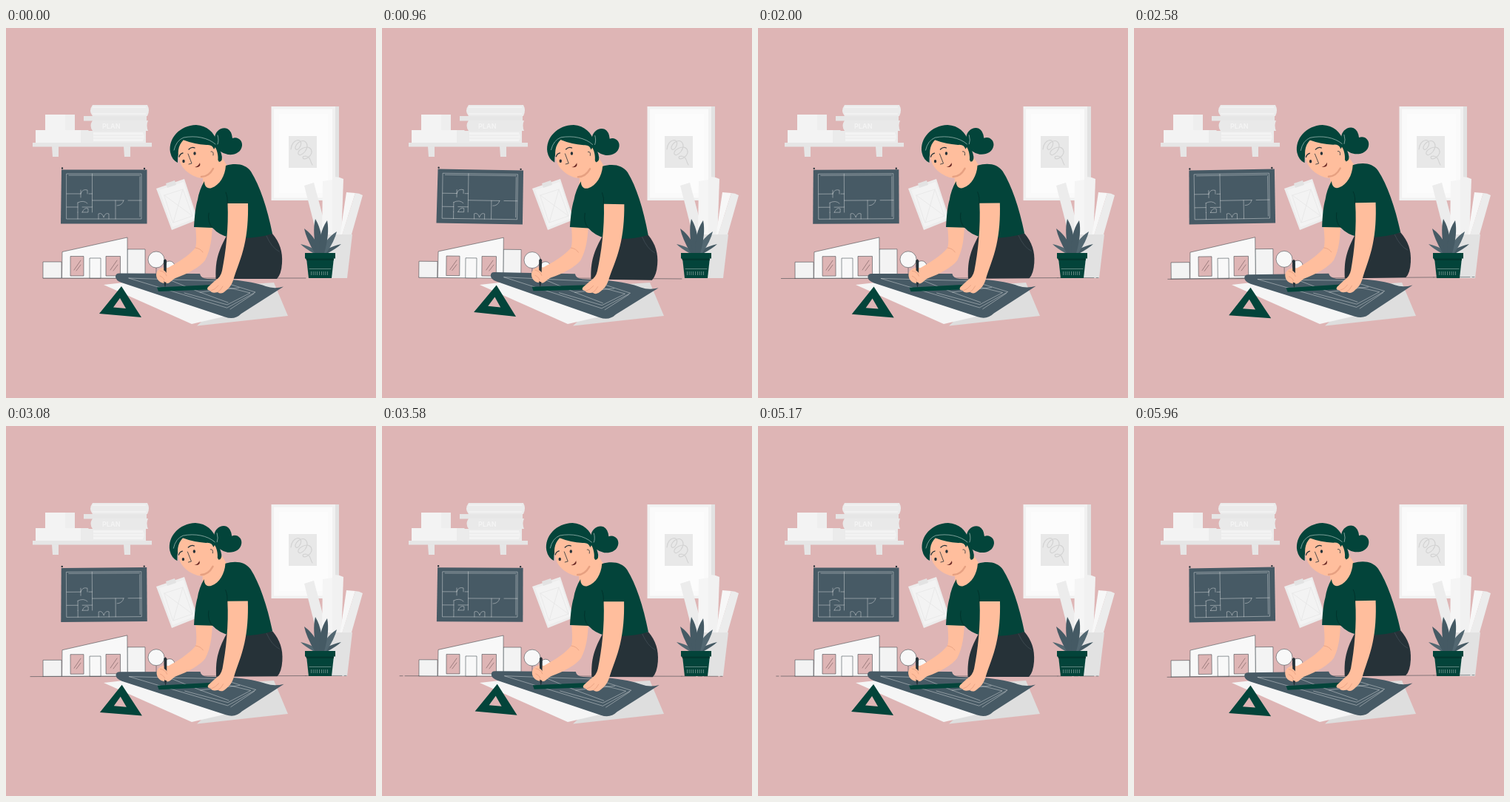
An HTML page that plays this animation: 500x500 px, repeating every 6000 ms.

```html
<!DOCTYPE html>
<html lang="en">
<head>
<meta charset="utf-8">
<title>Architect at work</title>
<style>
html, body { margin: 0; width: 100%; height: 100%; overflow: hidden; background: #deb5b5; }
svg { display: block; width: 100vw; height: 100vh; }
.line { fill: none; stroke-linecap: round; stroke-linejoin: round; }
.ink { stroke: #263238; stroke-width: .5; }
.chalk { stroke: #f2f2f2; stroke-width: .55; opacity: .75; }
.green { fill: #03443a; }
.slate { fill: #475a65; }
.dark { fill: #263238; }
.skin { fill: #ffbe9d; }
</style>
</head>
<body>
<svg viewBox="0 0 500 500">
  <rect width="500" height="500" fill="#deb5b5"/>

  <g id="shelf">
    <path fill="#e6e6e6" d="M62 160h9v14h-8zM159 160h9v14h-8z"/>
    <path fill="#e6e6e6" d="M36 155h161v5.500H36zM105 119h85v6.500h-85z"/>
    <path fill="#f3f3f3" d="M53 117h27v21H53z"/>
    <path fill="#eeeeee" d="M80 117h13v21H80z"/>
    <path fill="#f3f3f3" d="M40 138h61v17H40z"/>
    <path fill="#ebebeb" d="M101 138h10l2 2v15h-12z"/>
    <path fill="#ebebeb" d="M117 104h74q4 7 0 15h-74q-6-7 0-15z"/>
    <path fill="#f1f1f1" d="M117 106h72v2h-72zM117 115h72v2h-72z"/>
    <path fill="#e9e9e9" d="M117 125h75q-3 7 0 14h-75q-5-7 0-14z"/>
    <path fill="#ebebeb" d="M105 139h84v16h-84q-6-8 0-16z"/>
    <path fill="#f3f3f3" d="M118 141h67q3 6 0 12h-67z"/>
    <path class="line" stroke="#e2e2e2" stroke-width=".7" d="M118 145h67M118 149h67"/>
    <text x="130" y="136" font-family="Inter, sans-serif" font-size="9" font-weight="700" fill="#f4f4f4">PLAN</text>
  </g>

  <g id="picture">
    <path fill="#e2e2e2" d="M444 106h6v127h-6z"/>
    <path fill="#f1f1f1" d="M358.500 106H445v127h-86.500z"/>
    <path fill="#fafafa" d="M362 109.500h79v120h-79z"/>
    <path fill="#fff" d="M369 116h66v107h-66z" opacity=".4"/>
    <path fill="#e8e8e8" d="M382 146h38v43h-38z"/>
    <path class="line" stroke="#d3d3d3" stroke-width="1.200" d="M385 164C386 149 402 148 398 159C394 169 386 163 395 155C404 148 411 157 404 167C396 177 390 168 400 163C412 156 418 169 408 175C401 180 398 173 405 173C412 174 411 181 414 185"/>
  </g>

  <g id="rolls">
    <path fill="#ececec" d="M403 213l13-4 16 60-9 22z"/>
    <path fill="#f5f5f5" d="M428 207l13-2v82l-14-5z"/>
    <path fill="#f1f1f1" d="M441 202q7-2 15 2l-3 84h-12z"/>
    <path fill="#f7f7f7" d="M460 222l12 1-19 61-2-2z"/>
    <path fill="#ececec" d="M472 223q5 0 10 3l-17 60h-13z"/>
    <path fill="#e2e2e2" d="M432 279h36l-7 59h-31z"/>
  </g>

  <g id="clipboard">
    <path fill="#ededed" d="M203 217l38-13 18 55-35 14z"/>
    <path fill="#f3f3f3" d="M207 219l33-11 16 49-31 12z"/>
    <path fill="#e3e3e3" d="M216 210l12-4 2 6-12 4z"/>
    <path class="line" stroke="#e6e6e6" stroke-width=".8" d="M214 226l25-8 13 36-26 9zM214 226l38 28M239 218l-13 45"/>
  </g>

  <g id="floor">
    <path class="line ink" d="M50 338H405"/>
    <path id="tails" class="line ink" stroke-dasharray="19 3 6 2"/>
  </g>

  <g id="house">
    <g class="ink" fill="#f8f8f8">
      <path d="M50 316h25v22H50zM164 299h24v39h-24z" fill="#f3f3f3"/>
      <path d="M75.500 338L76 302.500 164 283v55z"/>
      <path d="M113 311h15v27h-15z"/>
      <path d="M87 308.500h18V335H87zM135 308.500h19.500V335H135z" fill="#deb5b5"/>
      <path d="M203 324v14M221 328v10"/>
      <circle cx="203" cy="313" r="11"/>
      <circle cx="221" cy="322" r="7"/>
    </g>
    <path class="line" stroke="#8d6f70" stroke-width=".8" d="M92 327l9-13M95 328l6-8M141 327l9-13M145 328l6-8"/>
  </g>

  <g id="plant">
    <g id="leaves"></g>
    <path class="green" d="M406 311h37l-3 27h-31z"/>
    <path fill="#02372f" d="M405 311h38v3h-37z"/>
    <path class="green" d="M404 304h41v7.500h-41z"/>
    <path class="line" stroke="#9fb2ad" stroke-width=".6" d="M410 325.500h29"/>
    <path fill="none" stroke="#9fb2ad" stroke-width="5" stroke-dasharray=".6 2.200" d="M412 331.500h25"/>
  </g>

  <g id="board">
    <path class="slate" d="M75 191.500h115.500V264.500H74z"/>
    <circle class="dark" cx="76" cy="189.500" r="1.200"/>
    <circle class="dark" cx="187" cy="190" r="1.200"/>
    <path class="line chalk" d="M82 197H183V258H82zM85 199H181M181 201V255M116.500 197V233H159M165 233H183M82 224H101M101 219V229M112 224H116.500M82 242H97M103 242H116.500V233M97 236V249M97 249V258M116.500 242V249M148 233V258M101 224Q103 217 110 219V224M97 236Q105 232 110 237M103 249Q106 242 111 244V249H103M125 258V251Q130 249 132 256Q134 249 139 251V258M159 233Q157 240 150 240"/>
  </g>

  <path fill="#dedede" d="M258 402.500L381 389 362 344 318 347z"/>
  <path fill="#f5f5f5" d="M132 347l36-4L303 388 251 400z"/>

  <g id="desk">
    <path class="dark" d="M298 281L360 278C370 290 374 302 373 318Q372 333 366 339H283.500C283 320 284 306 298 281z"/>
    <path class="line" stroke="#45525a" stroke-width=".7" d="M352 281Q359 297 369 302"/>

    <path class="slate" d="M148 336Q148 331.500 153 331.500L262 332Q263 338 272 339L304 340C325 342 341 345 351 349Q362 353 375 349.500L318 386Q309 395 296 390.500L156 344Q148 341 148 336z"/>
    <path class="line chalk" d="M166 338L289 342 337 357 299 378zM220 340L262 357 315 351M241 358L299 374 330 358 285 347M262 357L300 371M303 380L335 359"/>

    <path class="green" fill-rule="evenodd" d="M156 349L183 391 126 386zM154 365L145 377.500 162 379z"/>

    <path class="skin" d="M256 267C257 279 258 290 256 297C246 309 230 318 219 324C211 322 204 326 203 333C203 341 209 346 219 345C222 344 225 340 229 338C246 332 262 323 269 314C277 299 278 283 279 268z"/>
    <path class="green" d="M204 350.500L278 347 273 353.500 206 356z"/>
    <path class="dark" d="M213 314l2-2 2 2-.5 31-1.500 6-1.500-6z"/>
    <path class="skin" d="M206 327Q214 325 218 333L221 341Q216 346 213 342L207 336z"/>
    <path class="line" stroke="#e39a7c" stroke-width=".7" d="M208 328Q215 329 217 335M208 335Q213 337 214 341M256 297Q263 298 266 303"/>

    <path class="skin" d="M266 192L290 172 300 188 292 222 272 226 266 215z"/>
    <path class="green" d="M268 207C268 214 272 218 278 216C289 212 296 200 297 186C311 182 324 184 331 194C343 213 353 243 360 278Q335 286 302 283Q288 280 279 270L254 269C255 253 256 242 259 232Q261 219 268 207z"/>
    <path class="line" stroke="#022f28" stroke-width=".8" d="M274 250Q272 263 279 270M297 222Q300 229 299 238"/>

    <path class="skin" d="M299.500 237H327C327.500 258 326 277 322 294C318 312 311 327 307 341Q304 350 297 355Q291 361 286 357Q278 359 276 355Q270 354 273 350L283 341Q290 337 292 328C297 303 301 270 299.500 237z"/>
    <path class="line" stroke="#e39a7c" stroke-width=".7" d="M287 348Q282 354 277 355M293 349Q290 355 286 357"/>

    <path class="green" d="M282 149C282 140 291 133 299 136Q305 139 306 149C313 146 320 152 319 159C318 168 309 172 300 171Q288 169 283 158z"/>
    <path class="green" d="M222 168C219 149 235 131.500 257 131C272 132 281 141 285 153L291 170Q294 180 288 181L275 161 240 155Q231 168 232 182Q224 178 222 168z"/>
    <path class="skin" d="M240 151C232 159 231 170 235 181C239 191 246 196 254 200Q268 207 276 197L286 181C288 174 285 160 279 158Q258 156 240 151z"/>
    <path class="green" d="M239 151Q253 147 279 156L284 159 281 164Q279 157 271 158Q254 157 239 151z"/>
    <path class="line" stroke="#e6a081" stroke-width="2.500" d="M264 201Q274 201 280 190"/>
    <path class="line" stroke="#dbe5e2" stroke-width=".55" d="M227 165Q230 152 240 148C256 145 273 148 283 157M286 145Q288 152 286 157"/>
    <path class="line" stroke="#263238" stroke-width="1.300" d="M234 174Q235 170 239 169M247 164Q251 160 255 162"/>
    <path class="line" stroke="#263238" stroke-width=".8" d="M246 170L251 183 247 184M277 167Q281 166 280 172"/>
    <ellipse class="dark" cx="240" cy="180" rx="1.700" ry="2.200"/>
    <ellipse class="dark" cx="255" cy="169.500" rx="1.700" ry="2.200"/>
    <path fill="#6b2925" d="M255 188Q260 187 262 182Q264 189 255 188z"/>
  </g>
</svg>
<script>
const LOOP = 6000;
const SWAY = LOOP / 1.75;
const byId = id => document.getElementById(id);

// Each leaf runs from the pot to its tip, widest near the middle.
const tips = [[398, 292], [453, 292], [403, 271], [447, 275], [418, 258], [434, 260]];
byId('leaves').innerHTML = tips.map(([x, y], i) => {
  const base = 425 + (x - 425) * .2;
  const mid = base + (x - base) * .4;
  const h = 305 + (y - 305) * .6;
  return `<path fill="${i % 3 ? '#455a64' : '#526771'}" d="M${base - 3} 305Q${mid - 8} ${h} ${x} ${y}Q${mid + 8} ${h} ${base + 3} 305z"/>`;
}).join('');

// Linear swing: 0, +1, -1, 0 at 0, 25, 75 and 100 percent.
function swing(t) {
  const p = (t / SWAY) % 1;
  return p < .25 ? p * 4 : p < .75 ? 2 - p * 4 : p * 4 - 4;
}

function turn(id, angle, x, y) {
  byId(id).setAttribute('transform', `rotate(${angle} ${x} ${y})`);
}

function draw(t) {
  const s = swing(t);
  turn('desk', s, 253, 262);
  turn('board', s, 132.500, 228);
  turn('house', s * .6, 138, 312);
  turn('floor', s * .4, 246, 338);
  const left = 24 + 22 * Math.max(0, -s);
  byId('tails').setAttribute('d', t > 1000 ? `M50 338H${left}M405 338H460` : '');
}

function tick(now) {
  draw(now % LOOP);
  requestAnimationFrame(tick);
}
draw(0);
requestAnimationFrame(tick);
</script>
</body>
</html>
```
